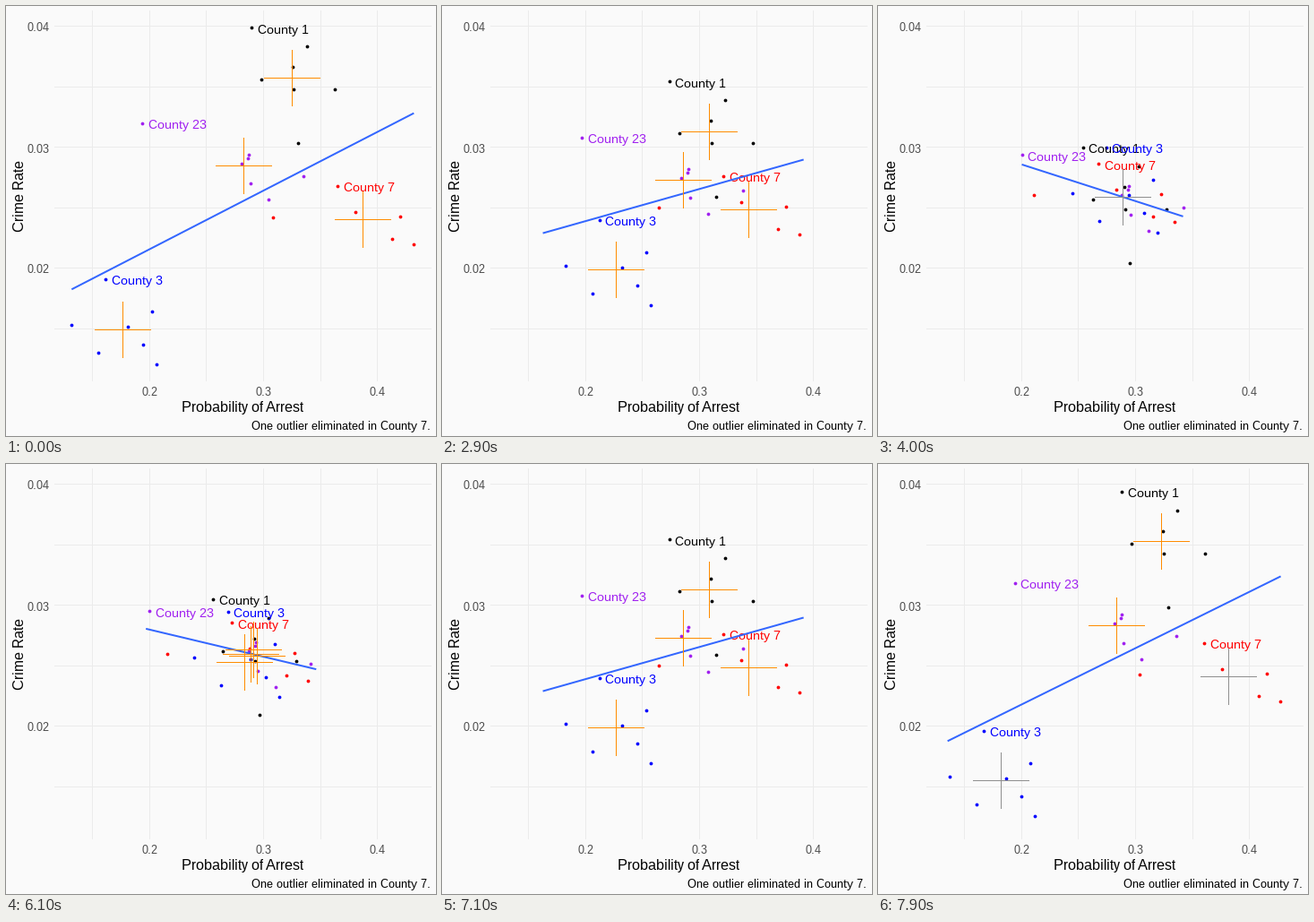
A matplotlib script that plays this animation: 480x480 px, repeating every 8000 ms.

```python
import numpy as np
import matplotlib.pyplot as plt
from matplotlib.animation import FuncAnimation

SIZE, DPI = 480, 72          # at 72 dpi one point is one pixel
STEPS, FRAMES, INTERVAL = 20, 80, 100
ORANGE, GREY = "#ff8c00", "#8f8f8f"
ARM = 31

plt.rcParams.update({"font.family": "Liberation Sans",
                     "text.hinting": "native", "text.hinting_factor": 1})

# The observations of each county; the first one carries the label.
COUNTIES = {
    "County 1": ("black", [(274, 24), (336, 45), (320, 68), (285, 82),
                           (321, 93), (367, 93), (326, 153)]),
    "County 3": ("blue", [(111, 305), (73, 356), (136, 358), (163, 341),
                          (153, 378), (103, 387), (168, 400)]),
    "County 7": ("red", [(370, 201), (390, 230), (440, 235), (298, 236),
                         (431, 260), (455, 266)]),
    "County 23": ("#a020f0", [(152, 131), (271, 166), (270, 170), (263, 176),
                              (273, 198), (293, 216), (332, 190)]),
}
# crosses that turn grey at a given step
GREYED = {1: ("County 3", "County 7"), STEPS: tuple(COUNTIES)}

fig = plt.figure(figsize=(SIZE / DPI, SIZE / DPI), dpi=DPI, facecolor="#fafafa")
ax = fig.add_axes([0, 0, 1, 1])
ax.set(xlim=(0, SIZE), ylim=(SIZE, 0))
ax.axis("off")


def put_text(x, y, text, size, color="black", ha="left", **kw):
    return ax.text(x, y, text, fontsize=size, color=color, ha=ha,
                   va="baseline", **kw)


def draw_panel():
    grid = dict(color="#ebebeb", lw=1, zorder=0)
    for k in range(6):
        x, y = int(96.5 + 63.64 * k), int(22.5 + 67.5 * k)
        ax.plot([54, 474], [y, y], **grid)
        ax.plot([x, x], [5, 418], **grid)
    for k in range(3):
        put_text(49, 28.5 + 135 * k, f"0.0{4 - k}", 13, "#4d4d4d", "right")
        put_text(160.2 + 127.2 * k, 435, f"0.{k + 2}", 13, "#4d4d4d", "center")
    put_text(264, 453, "Probability of Arrest", 16, ha="center")
    put_text(19.6, 212, "Crime Rate", 16, ha="center",
             rotation=90, rotation_mode="anchor")
    put_text(474, 473, "One outlier eliminated in County 7.", 13, ha="right")


def fit_ends(points):
    """Ends of the least-squares line over the range of the points."""
    x, y = points.T
    ends = np.array([x.min(), x.max()])
    return np.column_stack([ends, np.polyval(np.polyfit(x, y, 1), ends)])


class County:
    def __init__(self, name, color, points):
        self.name = name
        self.points = np.array(points) + (0.3, 0)
        self.mean = self.points.mean(axis=0)
        self.dots, = ax.plot([], [], "o", ms=3.8, mew=0, color=color, zorder=2)
        self.label = put_text(0, 0, name, 14, color, zorder=3)
        self.arms = [ax.plot([], [], lw=1, zorder=5)[0] for _ in range(2)]

    def move(self, step):
        shift = (centre - self.mean) * step / STEPS
        points = self.points + shift
        self.dots.set_data(*points.T)
        self.label.set_position(points[0] + 6.5)
        x, y = self.mean + shift
        self.arms[0].set_data([x - ARM, x + ARM], [y, y])
        self.arms[1].set_data([x, x], [y - ARM, y + ARM])
        for arm in self.arms:
            arm.set_color(GREY if self.name in GREYED.get(step, ()) else ORANGE)


draw_panel()
counties = [County(name, *spec) for name, spec in COUNTIES.items()]
raw = np.vstack([c.points for c in counties])
centre = raw.mean(axis=0)
within = np.vstack([c.points - c.mean + centre for c in counties])
raw_ends, within_ends = fit_ends(raw), fit_ends(within)
fit, = ax.plot([], [], color="#3366ff", lw=2, solid_capstyle="butt", zorder=4)


def step_at(frame):
    """Hold, slide to the common mean, hold, slide back."""
    if frame <= 40:
        return max(0, frame - 20)
    return min(STEPS, FRAMES - frame)


def update(frame):
    step = step_at(frame)
    for county in counties:
        county.move(step)
    fit.set_data(*(raw_ends + (within_ends - raw_ends) * step / STEPS).T)
    return []


anim = FuncAnimation(fig, update, frames=FRAMES, interval=INTERVAL,
                     repeat=True, repeat_delay=0)
plt.show()
```
